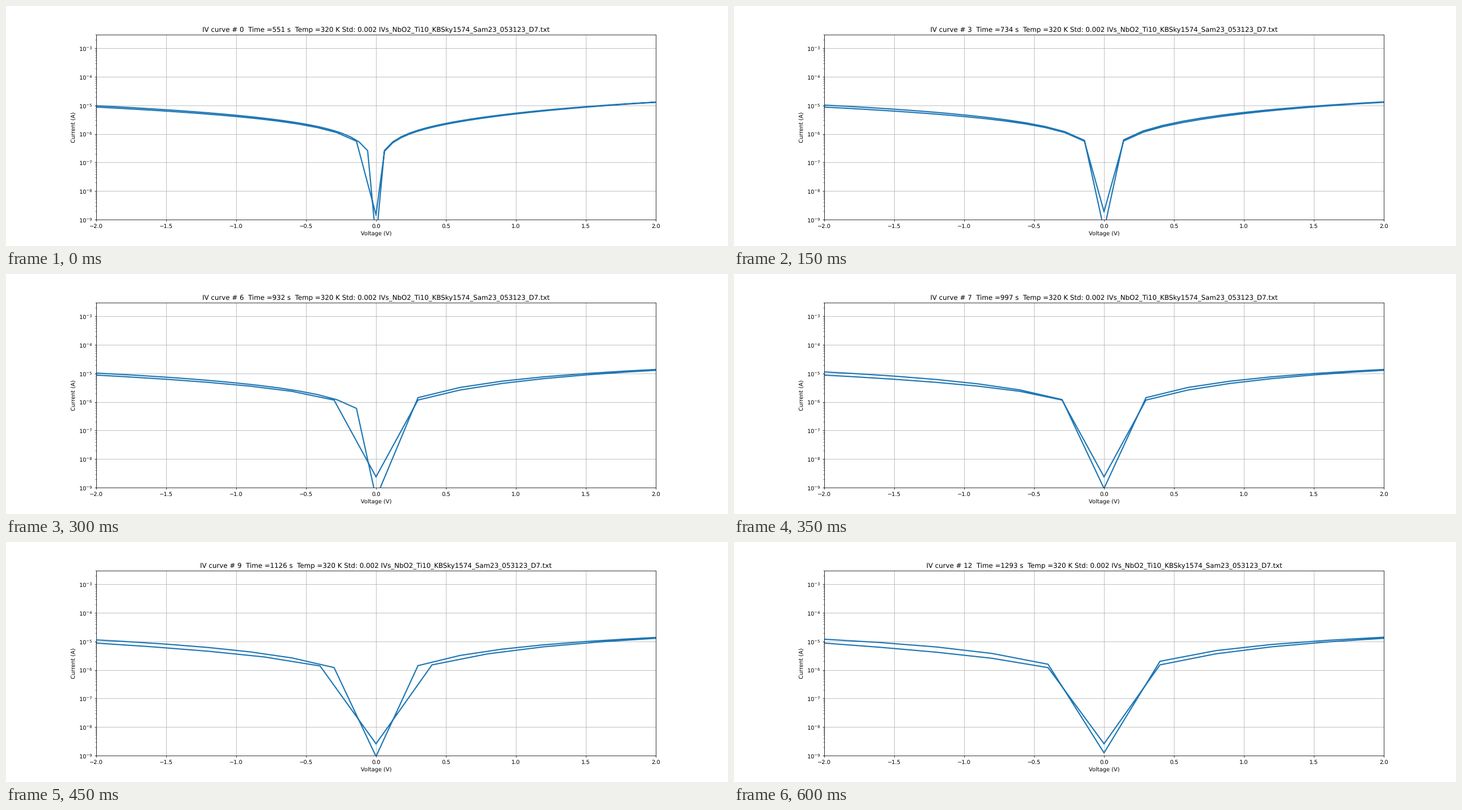
Animation, 1280 px wide and 427 px high, one loop 0.65 s. Source, as a matplotlib script:

```python
import numpy as np
import matplotlib.pyplot as plt
from matplotlib.animation import FuncAnimation

DPI = 640 / 9
WIDTH, HEIGHT = 1280, 427
FRAMES, INTERVAL = 13, 50
V_MAX = 2.0
STEPS = [0.06, 0.14, 0.3, 0.4, 0.4]
TIME_KEYS = {0: 551, 3: 734, 5: 868, 7: 997, 8: 1076, 10: 1176, 12: 1293}
SAMPLE = "IVs_NbO2_Ti10_KBSky1574_Sam23_053123_D7.txt"


def branch(step, low, high, bend):
    """Voltages and currents; conductance rises from low to high microsiemens."""
    volts = np.append(np.arange(step, V_MAX - 1e-6, step), V_MAX)
    u2 = (volts / V_MAX) ** 2
    rise = u2 * (1 + bend) / (u2 + bend)
    return volts, 1e-6 * volts * (low + (high - low) * rise)


def sweep(n):
    """Full loop 0, +2, 0, -2, 0; each curve refreshes one branch in turn."""
    a, b, c, d = (STEPS[(n + lag) // 4] for lag in (3, 2, 1, 4))
    memory = STEPS[n // 4]  # outgoing step when the last branch was refreshed

    va, ia = branch(a, 4.1 - 4.5 * a**2, 6.45, 0.3 + 0.04 / a)
    vb, ib = branch(b, 4.4, 6.48 + 1.4 * b, 0.05 + 0.04 / b)
    vc, ic = branch(c, 4.35 - 5 * c**2, 4.7 + 3.2 * c, 0.1 / c)
    vd, id_ = branch(d, 4.0 - 6.5 * memory**2, 4.38, 10)

    start, crossing = 3.4e-9 * a**0.3, 3.1e-9 * c
    volts = np.concatenate([[0], va, vb[::-1], [0], -vc, -vd[::-1], [0]])
    amps = np.concatenate([[start], ia, ib[::-1], [crossing], ic, id_[::-1], [start]])
    return volts, amps


plt.rcParams["text.hinting"] = "none"
fig, ax = plt.subplots(
    figsize=((WIDTH + 1e-6) / DPI, (HEIGHT + 1e-6) / DPI), dpi=DPI, facecolor="white"
)
fig.subplots_adjust(bottom=0.1103)
ax.set_yscale("log")
ax.set_xlim(-V_MAX, V_MAX)
ax.set_ylim(1e-9, 3e-3)
ax.set_xlabel("Voltage (V)")
ax.set_ylabel("Current (A)")
ax.grid(True)
(line,) = ax.plot([], [], color="#1f77b4", linewidth=2.2)
title = ax.set_title("")


def update(n):
    line.set_data(*sweep(n))
    seconds = np.interp(n, list(TIME_KEYS), list(TIME_KEYS.values()))
    std = 0.001 if n == 10 else 0.002
    title.set_text(
        f"IV curve # {n}  Time ={seconds:.0f} s  Temp =320 K Std: {std:.3f} {SAMPLE}"
    )
    return line, title


anim = FuncAnimation(
    fig, update, frames=FRAMES, init_func=lambda: update(0),
    interval=INTERVAL, repeat=True, repeat_delay=0, blit=False,
)
plt.show()
```
